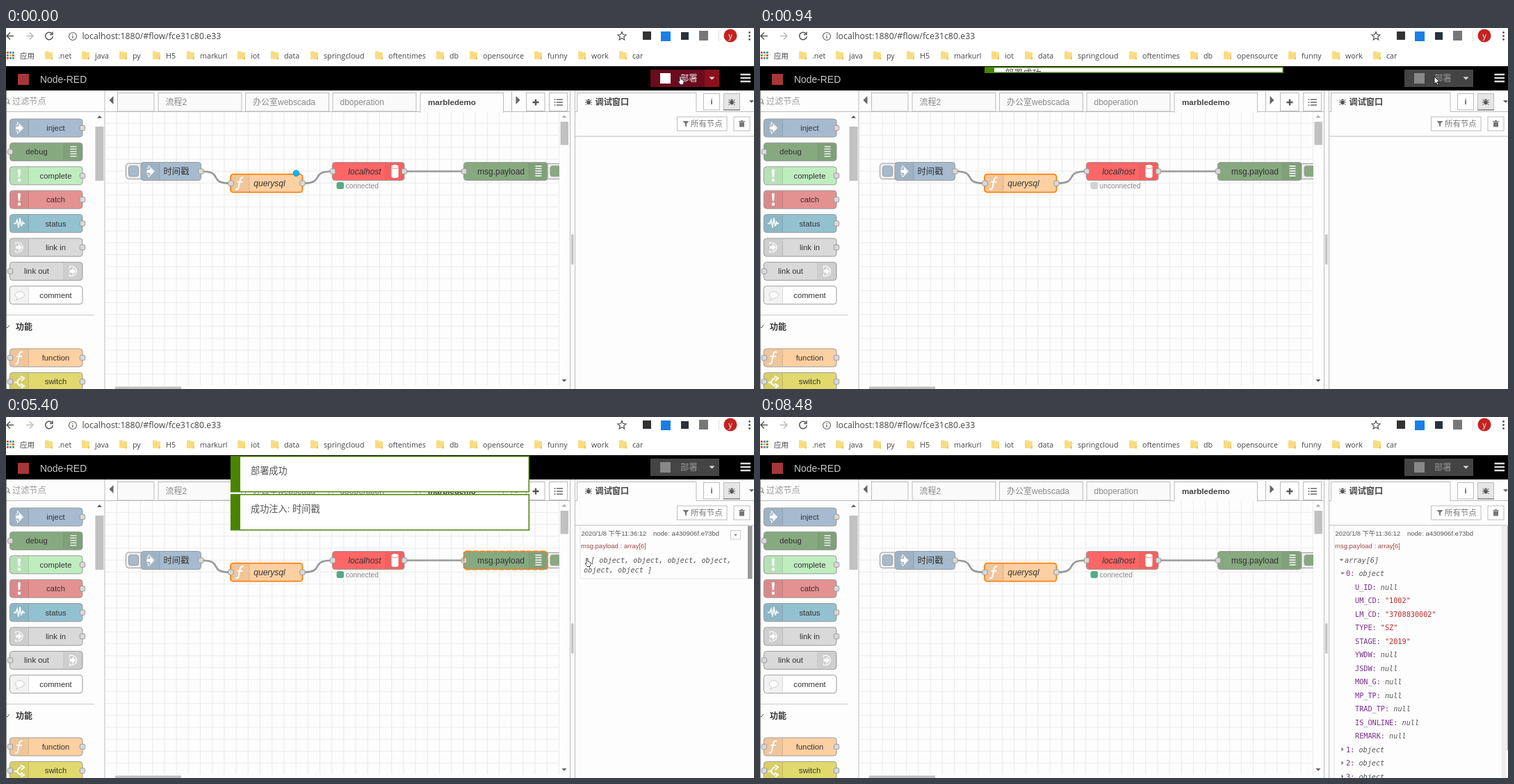
Recreate the animation shown at these times as an HTML page. Size 1076 px wide and 520 px high, loop 9.35 s.

```html
<!DOCTYPE html>
<html lang="zh-CN">
<head>
<meta charset="utf-8">
<title>Flow editor</title>
<style>
  html, body { margin: 0; width: 100%; height: 100%; overflow: hidden; background: #fff; }
  svg { display: block; width: 1076px; height: 520px; }
  text { font-family: "Liberation Sans", "Noto Sans CJK SC", "Noto Sans CJK", sans-serif; white-space: pre; }
  .ui { font-family: "Open Sans", "Noto Sans CJK SC", "Noto Sans CJK", sans-serif; }
  .mono { font-family: "DejaVu Sans Mono", monospace; }
  .mid { text-anchor: middle; }
  .it { font-style: italic; }
  .b { font-weight: bold; }
</style>
</head>
<body>
<svg viewBox="0 0 1076 520">
  <g id="page"></g>
  <g id="live"></g>
</svg>
<script>
const LOOP = 9350;
const LINE = '#bbb', GREY = '#999', ORANGE = '#ff7f0e', PAPER = '#fdfdfd';
const page = document.getElementById('page');
const live = document.getElementById('live');

const rect = (x, y, w, h, fill, stroke = 'none', rx = 0, more = '') =>
  `<rect x="${x}" y="${y}" width="${w}" height="${h}" fill="${fill}" stroke="${stroke}" rx="${rx}" ${more}/>`;
const path = (d, fill = 'none', stroke = 'none', w = 1, more = '') =>
  `<path d="${d}" fill="${fill}" stroke="${stroke}" stroke-width="${w}" ${more}/>`;
const text = (x, y, s, size, fill, cls = '') =>
  `<text x="${x}" y="${y}" font-size="${size}" fill="${fill}" class="${cls}">${s}</text>`;
const circle = (x, y, r, fill, stroke = 'none', w = 1) =>
  `<circle cx="${x}" cy="${y}" r="${r}" fill="${fill}" stroke="${stroke}" stroke-width="${w}"/>`;
const at = (x, y, s) => `<g transform="translate(${x} ${y})">${s}</g>`;
const tri = (x, y, dir, s, fill) => {
  const d = { down: `M${-s}${-s / 2}H${s}L0 ${s / 2}z`, up: `M${-s} ${s / 2}H${s}L0${-s / 2}z`,
    right: `M${-s / 2}${-s}V${s}L${s / 2} 0z`, left: `M${s / 2}${-s}V${s}L${-s / 2} 0z` };
  return at(x, y, path(d[dir], fill));
};

const icons = {
  inject: path('M-5-2.2h4.5v-3.3L5 0l-5.500 5.500V2.2H-5z', '#fff') +
    path('M-5-4.500h2.500v-4L6 0l-8.500 8.500v-4H-5', 'none', '#fff', 1),
  debug: path('M-4-7.5h9M-4-4h9M-4-.5h9M-4 3h9M-4 6.5h9', 'none', '#fff', 1.4),
  bang: path('M-2-9h4l-.8 11h-2.4zM-2 4.5h4v4h-4z', '#fff'),
  pulse: path('M-8 0h3l2-5 2 11 2-14 2 12 2-6 1 2h2', 'none', '#fff', 1.6),
  link: path('M-5-2h4v-3.500L4 0l-5 5.500V2h-4z', '#fff') +
    path('M-5-4v-3h4q6 2 6 7t-6 7h-4V4', 'none', '#fff', 1.2),
  comment: path('M-2 4a6.5 4.8 0 1 1 3 .5q-3 3-6 2.5q2-1 3-3z', '#fff', '#ccc'),
  func: path('M5-8Q1-10 0-4L-2 6Q-3 10-6 8M-4-2H4', 'none', '#fff', 2),
  fork: path('M-7 1h4q2-6 6-6M-3 1q2 5 6 5M2-8l5 3-4 4M2 3l5 3-4 3', 'none', '#fff', 2),
  db: path('M-5-7a5 2.5 0 0 1 10 0V7a5 2.5 0 0 1-10 0z', '#fff') +
    path('M-5-6.5a5 2.5 0 0 0 10 0', 'none', '#f88'),
  bug: path('M-2.5-2h5v4q-2.5 4-5 0zM-1.5-4h3v1.5h-3z', '#555') +
    path('M-4.5-3.5l2 2M4.5-3.5l-2 2M-5 .5H5M-4.5 4.5l2-2M4.5 4.5l-2-2', 'none', '#555'),
  trash: path('M-3.5-2.5h7v7h-7zM-4.5-4h9v1h-9zM-1.5-5h3v1h-3z', '#777')
};
const port = (x, y) => rect(x - 3.7, y - 3.7, 7.4, 7.4, '#d9d9d9', GREY, 2);

// Node with its icon on side 'l' or 'r', ports as 'l', 'r' or 'lr', and the label centred on tx
function node(x, y, w, fill, icon, side, ports, label, tx, opt = {}) {
  const top = y - 13, ix = side === 'l' ? x : x + w - 27;
  const edge = side === 'l' ? x + 27 : ix;
  return rect(x, top, w, 26, fill, opt.stroke || GREY, 4, opt.stroke ? 'stroke-width="1.8"' : '') +
    rect(ix + 1, top + 1, 26, 24, 'rgba(0,0,0,.05)') +
    path(`M${edge} ${top + .5}v25`, 'none', 'rgba(0,0,0,.12)') +
    at(ix + 13.5, y, icons[icon]) +
    (ports.includes('l') ? port(x + .5, y) : '') + (ports.includes('r') ? port(x + w, y) : '') +
    text(tx, y + 4, label, opt.size || 12, '#333', 'mid ' + (opt.cls || ''));
}
const wire = (x0, y0, x1, y1, bend) =>
  path(`M${x0} ${y0}C${x0 + bend} ${y0} ${x1 - bend} ${y1} ${x1} ${y1}`, 'none', GREY, 2.6);

function browser() {
  const marks = { '.net': 75, java: 128, py: 182, H5: 230, markurl: 279, iot: 352, data: 400, springcloud: 457,
    oftentimes: 550, db: 638, opensource: 686, funny: 779, work: 842, car: 901 };
  let s = rect(0, 0, 1076, 55, '#fff');
  s += path('M11 11.5H1M6 6.5L1 11.5l5 5', 'none', '#555', 1.5);
  s += path('M29 11.5h10M34 6.5l5 5-5 5', 'none', '#bbb', 1.5);
  s += path('M66 8a5.3 5.3 0 1 0 1.3 4M67 5.5v4h-4', 'none', '#555', 1.5);
  s += circle(96, 12, 5.5, 'none', '#666', 1.2) + path('M96 11v4M96 8.5v1.3', 'none', '#666', 1.3);
  s += text(109.5, 16, 'localhost:1880/#flow/fce31c80.e33', 12.35, '#444', 'ui');
  s += path('M886 5.5l1.7 4 4.3.4-3.3 2.8 1 4.3-3.7-2.3-3.7 2.3 1-4.3-3.3-2.8 4.3-.4z', 'none', '#555', 1.2);
  s += rect(916, 5, 12, 12, '#333') + rect(942, 5, 14, 14, '#1a7ee6') + rect(971, 6, 11, 11, '#28323c') +
    rect(997, 4, 13, 14, '#777') + rect(1025, 4, 1, 15, '#ddd');
  s += circle(1042, 11, 9.5, '#c5221f') + text(1042, 15, 'y', 11, '#fff', 'ui mid');
  for (let i = 0; i < 3; i++) s += circle(1069.5, 6.5 + i * 5, 1.4, '#555');
  const dots = ['#e94335', '#fbbc05', '#34a853', '#4285f4'];
  for (let i = 0; i < 9; i++) s += rect(1 + i % 3 * 4, 34 + (i / 3 | 0) * 4, 2.8, 2.8, dots[(i * 3 + (i / 3 | 0)) % 4]);
  s += text(20, 44, '应用', 10.5, '#444', 'ui');
  for (const [name, x] of Object.entries(marks))
    s += path(`M${x - 19} 33.5h5l1 1.5h5v10h-11z`, '#f9dc82') + rect(x - 10, 42, 2, 3.5, '#eac55c') +
      text(x, 44, name, 10.7, '#444', 'ui');
  return s;
}

function palette() {
  const items = [
    ['#a6bbcf', 'inject', 'l', 'r', 'inject'], ['#87a980', 'debug', 'r', 'l', 'debug'],
    ['#c0edc0', 'bang', 'l', 'r', 'complete'], ['#e49191', 'bang', 'l', 'r', 'catch'],
    ['#94c1d0', 'pulse', 'l', 'r', 'status'], ['#d9d9d9', 'link', 'l', 'r', 'link in'],
    ['#d9d9d9', 'link', 'r', 'l', 'link out'], ['#fff', 'comment', 'l', '', 'comment'],
    ['#fdd0a2', 'func', 'l', 'lr', 'function'], ['#e2d96e', 'fork', 'l', 'lr', 'switch']];
  let s = circle(1, 105, 3, 'none', '#888', 1.2) + path('M3 107l2.5 3', 'none', '#888', 1.4);
  s += text(9, 110, '过滤节点', 12.2, GREY) + path('M0 120.5H142', 'none', LINE);
  items.forEach(([fill, icon, side, ports, label], i) => {
    const y = (i < 8 ? 144 : 199.8) + i * 34.4;
    s += node(5.5, y, 104.5, fill, icon, side, ports, label, side === 'l' ? 71.5 : 44, { size: 11.3 });
  });
  s += path('M0 413.5H127', 'none', '#ccc') + path('M0 430l2 2 3-4', 'none', '#555');
  s += text(14, 434.5, '功能', 12, '#333', 'b');
  s += tri(134.5, 128, 'up', 3.5, '#555') + rect(128.5, 142, 12, 78, '#c1c1c1');
  return s + path('M142 90V520', 'none', LINE) + path('M.5 90V520', 'none', '#888');
}

function tabs() {
  const list = [[160.5, 52.5, ''], [219, 120, '流程2'], [344.5, 120, '办公室webscada'], [470, 120, 'dboperation']];
  let s = path('M143 120.5H811M160.5 92V120', 'none', LINE) + tri(151.5, 104, 'left', 6, '#666');
  for (const [x, w, label] of list)
    s += rect(x, 93.5, w, 26.5, '#fafafa', LINE) + text(x + 10.5, 110.5, label, 12, '#888');
  s += rect(596, 93.5, 119.5, 28, PAPER, LINE) + rect(596.5, 119.5, 118.5, 3, PAPER);
  s += text(607, 110.5, 'marbledemo', 11.6, '#444', 'b');
  s += path('M727.5 92V120', 'none', LINE) + tri(736.5, 104, 'right', 6, '#666');
  s += rect(748.5, 93.5, 26.5, 26, '#fff', LINE) + path('M757.5 107h9M762 102.5v9', 'none', '#555', 2.4);
  s += rect(781.5, 93.5, 26, 26, '#fff', LINE) +
    path('M792 103h9M792 107h9M792 111h9M788.5 103h2M788.5 107h2M788.5 111h2', 'none', '#666', 1.5);
  return s;
}

function canvas() {
  const step = 17.2;
  let d = '';
  for (let x = 193.5 - 2 * step; x < 796; x += step) d += `M${x.toFixed(1)} 121V515`;
  for (let y = 206.2 - 4 * step; y < 515; y += step) d += `M143 ${y.toFixed(1)}H796`;
  let s = path(d, 'none', '#eaeaea', 1, 'id="grid"');
  s += wire(280.5, 206.5, 323, 223.7, 34) + wire(426.5, 223.7, 469.5, 206.5, 34) + wire(573, 206.5, 658, 206.5, 60);
  s += rect(172.5, 195, 30, 22.5, '#eee', GREY, 4) + rect(176.5, 198.8, 14, 15, '#a6bbcf', GREY, 3);
  s += node(194, 206.5, 86.5, '#a6bbcf', 'inject', 'l', 'r', '时间戳', 245, { size: 12.3 });
  s += node(323, 223.7, 103.5, '#fdd0a2', 'func', 'l', 'lr', 'querysql', 379, { stroke: ORANGE, cls: 'it' });
  s += node(469.5, 206.5, 103.5, '#f66', 'db', 'r', 'lr', 'localhost', 516, { cls: 'it' });
  s += path('M770 195.5H796M770 217.5H796', 'none', GREY) + rect(770, 196, 26, 21, '#eee');
  s += path('M796 198.8H786q-3 0-3 3v9q0 3 3 3H796', '#87a980', GREY);
  s += node(658.5, 206.5, 120.5, '#87a980', 'debug', 'r', 'l', 'msg.payload', 712);
  s += tri(803, 127.5, 'up', 3.5, '#aaa') + rect(797.5, 135, 11.5, 33.5, '#c1c1c1') + tri(803, 508, 'down', 3.5, '#555');
  return s + rect(157, 516.5, 95, 4, '#c1c1c1');
}

function sidebar() {
  let s = path('M811.5 90V520M818.5 90V520', 'none', LINE) + rect(813.5, 297.5, 2.5, 43, '#ccc', '#bbb', 1);
  s += path('M819 120.5h2.5v-27H993v27H1076M819 156H1076', 'none', LINE);
  s += at(838, 106.5, icons.bug) + text(847.5, 111, '调试窗口', 12.2, '#444', 'b');
  s += rect(1003.5, 94.5, 23, 23.5, '#fff', LINE) + text(1015, 110, 'i', 11, '#555', 'b mid');
  s += rect(1032.5, 94.5, 23, 23.5, '#e6e6e6', LINE) + path('M1032 118H1056', 'none', '#888', 1.5) + at(1044, 106.5, icons.bug);
  s += tri(1072.5, 106, 'down', 3.5, '#555');
  s += rect(965.5, 128, 71.5, 20, '#fff', LINE) + path('M973.5 134h9l-3.5 4v4.5l-2-1.5v-3z', '#777') +
    text(985, 142, '所有节点', 11.4, '#777');
  return s + rect(1047, 128, 23, 20, '#fff', LINE) + at(1058.5, 138, icons.trash);
}

page.innerHTML = browser() + rect(0, 55, 1076, 35, '#000') + rect(0, 90, 1076, 430, PAPER) +
  rect(17, 66, 16, 16, '#a83638') + text(49, 79, 'Node-RED', 13.9, '#c7c7c7') +
  path('M1056.5 67h14.5M1056.5 72h14.5M1056.5 77h14.5', 'none', '#ddd', 2.4) +
  palette() + tabs() + canvas() + sidebar();
const grid = document.getElementById('grid');

// The screen was sampled in bursts: start, end, samples
const bursts = [[0, 0, 1], [310, 310, 1], [540, 940, 4], [1060, 1250, 2], [1390, 1650, 3], [1930, 2350, 4],
  [2500, 2920, 4], [3170, 3950, 7], [4200, 4200, 1], [4360, 5400, 8], [5540, 6210, 6], [6580, 7590, 8], [7710, 8480, 7]];
const ticks = bursts.flatMap(([a, b, n]) => Array.from({ length: n }, (_, i) => n < 2 ? a : a + (b - a) * i / (n - 1)));
const snap = t => ticks.filter(k => k <= t + .01).pop();

const way = [[0, 970, 70], [1250, 970, 70], [1390, 880, 150], [1650, 526, 269], [1930, 495, 266], [2350, 193.5, 231.5],
  [2640, 184, 210], [3300, 182, 204], [3560, 215, 232], [3950, 588.5, 350.5], [4200, 690, 330], [4360, 760, 295],
  [4800, 850, 235], [5200, 836, 204], [5540, 836, 204], [5800, 839, 221], [6600, 839, 221], [6900, 868, 250],
  [7590, 950, 320], [7800, 965, 350], [8350, 990, 535], [LOOP, 990, 535]];
function pointer(t) {
  const i = way.findIndex(p => p[0] > t), [t0, x0, y0] = way[i - 1], [t1, x1, y1] = way[i];
  const p = (t - t0) / (t1 - t0);
  return [x0 + (x1 - x0) * p, y0 + (y1 - y0) * p];
}
function cursor(t, x, y) {
  const onButton = x < 192 && y < 217;
  if (x > 143 && x < 797 && y > 120 && !onButton) return at(x, y, path('M-5.5 0h11M0-5.5v11', 'none', '#000', 1.4));
  if (t < 310 || onButton || x > 820 && x < 850 && t > 5100 && t < 6800)
    return at(x, y, path('M-1 0q1-1 2 0v4l3 1q1.5.5 1 3l-1 3.5h-4l-3-4.500q0-1.500 2 0z', '#fff', '#222', .8));
  return at(x, y, path('M0 0v10.5l2.5-2.3 1.6 3.7 1.8-.8-1.6-3.5h3.4z', '#fff', '#111', .9));
}

function deploy(t, busy) {
  const on = t < 310, ink = on ? '#eee' : GREY;
  let s = rect(927, 60, 99, 25, on ? '#8c101c' : '#444');
  if (on) s += rect(927, 60, 78, 25, '#6b0b1e');
  if (!busy) s += rect(941, 65, 15, 15, on ? '#fff' : '#888') + text(970, 77, '部署', 12.3, ink);
  return s + tri(1015.5, 72.5, 'down', 4, '#ddd');
}
function shade(t) {
  const fill = 'rgba(160,160,160,.5)';
  let s = rect(0, 55, 1076, 35, fill) + rect(0, 90, 811, 430, fill) + rect(818.5, 90, 258, 430, fill);
  for (let i = 0; i < 5; i++) {
    const h = 11 + 7 * Math.cos((i - 2) * .9 - (t - 540) / 130);
    s += rect(954.5 + i * 5, 72.5 - h / 2, 3, h, '#a8a8a8');
  }
  return s;
}

const swing = p => .5 - Math.cos(Math.PI * Math.min(1, Math.max(0, p))) / 2;
const open = (t, from, to) => swing((t - from) / 300) - swing((t - to) / 300);
function notice(y, p, msg, id) {
  if (p <= 0) return '';
  const h = 51 * p;
  return rect(323, y, 430, h + 1, '#fff') +
    `<clipPath id="${id}"><rect x="323" y="${y}" width="430" height="${h}"/></clipPath>` +
    `<g clip-path="url(#${id})">${text(352, y + 12 + 14 * p, msg, 13.2, '#555')}</g>` +
    rect(323.7, y + .7, 428.6, h, 'none', '#4b8400', 0, 'stroke-width="1.5"') + rect(323, y, 14, h + 1, '#4b8400');
}

const fields = { U_ID: 0, UM_CD: '1002', LM_CD: '3708830002', TYPE: 'SZ', STAGE: '2019', YWDW: 0, JSDW: 0,
  MON_G: 0, MP_TP: 0, TRAD_TP: 0, IS_ONLINE: 0, REMARK: 0 };
const mono = (x, y, s, fill, cls = '') => text(x, y, s, 10.2, fill, 'mono ' + cls);
const pair = (x, y, key, value, isText) => {
  const vx = x + (key.length + 2) * 6.14;
  return mono(x, y, key + ':', '#792e90') + mono(vx, y, value, isText ? '#b72828' : '#555', isText ? '' : 'it');
};
function rowTools(top) {
  let s = rect(827, top, 240, 19.5, '#f0f0f0');
  for (const x of [1014.5, 1030, 1047.5]) s += rect(x, top + 3.5, 13.5, 12.5, '#fff', '#ccc');
  return s + text(1017, top + 12, '›_', 8, '#777') + rect(1034, top + 6, 4, 6, '#fff', '#777') +
    rect(1036.5, top + 8, 4, 5, '#fff', '#777') + circle(1054.3, top + 8, 2, '#777') + rect(1053.8, top + 9, 1, 5, '#777');
}
function debugPane(t, x, y) {
  if (t < 3550) return '';
  const wide = t >= 5540, deep = t >= 6580;
  const bottom = deep ? 521 : wide ? 335 : 233;
  const over = x > 824 && y > 157 && y < bottom;
  const row = Math.floor((y - 196.3) / 19.5);
  let s = path(`M826 157V${bottom}H1074`, 'none', '#e4e4e4') +
    rect(1067, 157, 6.5, bottom - 157, over ? GREY : '#eee');
  if (deep) s += rect(1074.5, 157, 2, 323, '#b5b5b5');
  s += text(827.5, 171, '2020/1/8 下午11:36:12', 9.4, '#555') + text(931, 171, 'node: a430906f.e73bd', 9.5, '#555') +
    text(827, 188.5, 'msg.payload : array[6]', 9.5, '#a04545');
  if (over) {
    s += rect(1042.5, 163.5, 14, 12.5, '#fff', '#ccc') + tri(1049.5, 170, 'down', 2.5, '#777');
    s += rect(658.5, 193.5, 120.5, 26, 'none', ORANGE, 4, 'stroke-width="1.9" stroke-dasharray="7 2.6"');
    if (wide && row > 0) s += rowTools(215.8 + (row - 1) * 19.5);
  }
  if (!wide) return s + tri(836, 205.5, 'right', 3, '#777') +
    mono(841, 210, '[ object, object, object, object,', '#555', 'it') + mono(831, 224, 'object, object ]', '#555', 'it');
  s += tri(836.5, 206, 'down', 3, '#777') + mono(841, 209.5, 'array[6]', '#555', 'it');
  let line = 1;
  for (let i = 0; i < 6; i++) {
    const mid = 206.3 + 19.5 * line++, opened = deep && !i;
    s += tri(838, mid - .5, opened ? 'down' : 'right', 3, '#777') + pair(843, mid + 3.3, '' + i, 'object');
    if (opened) for (const [key, v] of Object.entries(fields))
      s += pair(856, 209.6 + 19.5 * line++, key, v ? `"${v}"` : 'null', v);
  }
  return s;
}

function draw(t) {
  const [x, y] = pointer(t);
  const busy = t >= 310 && t < 930, linked = t < 930 || t > 1200;
  const first = open(t, 865, 5865), second = open(t, 3130, 8130);
  grid.style.display = busy ? 'none' : '';
  live.innerHTML = deploy(t, busy) +
    (t < 930 ? circle(417.5, 209.3, 4.2, '#00bcff', '#0a86b8') : '') +
    rect(476, 222.5, 9.5, 9, linked ? '#5a8' : '#d3d3d3', linked ? '#5a8' : '#ccc', 2) +
    text(488.5, 230.5, linked ? 'connected' : 'unconnected', 10.3, '#888') +
    debugPane(t, x, y) + (busy ? shade(t) : '') +
    notice(56, first, '部署成功', 'n1') + notice(56 + 55 * first, second, '成功注入: 时间戳', 'n2') +
    cursor(t, x, y);
}

let shown = -1;
const start = performance.now();
function tick() {
  const t = snap((performance.now() - start) % LOOP);
  if (t !== shown) draw(shown = t);
  requestAnimationFrame(tick);
}
tick();
</script>
</body>
</html>
```
